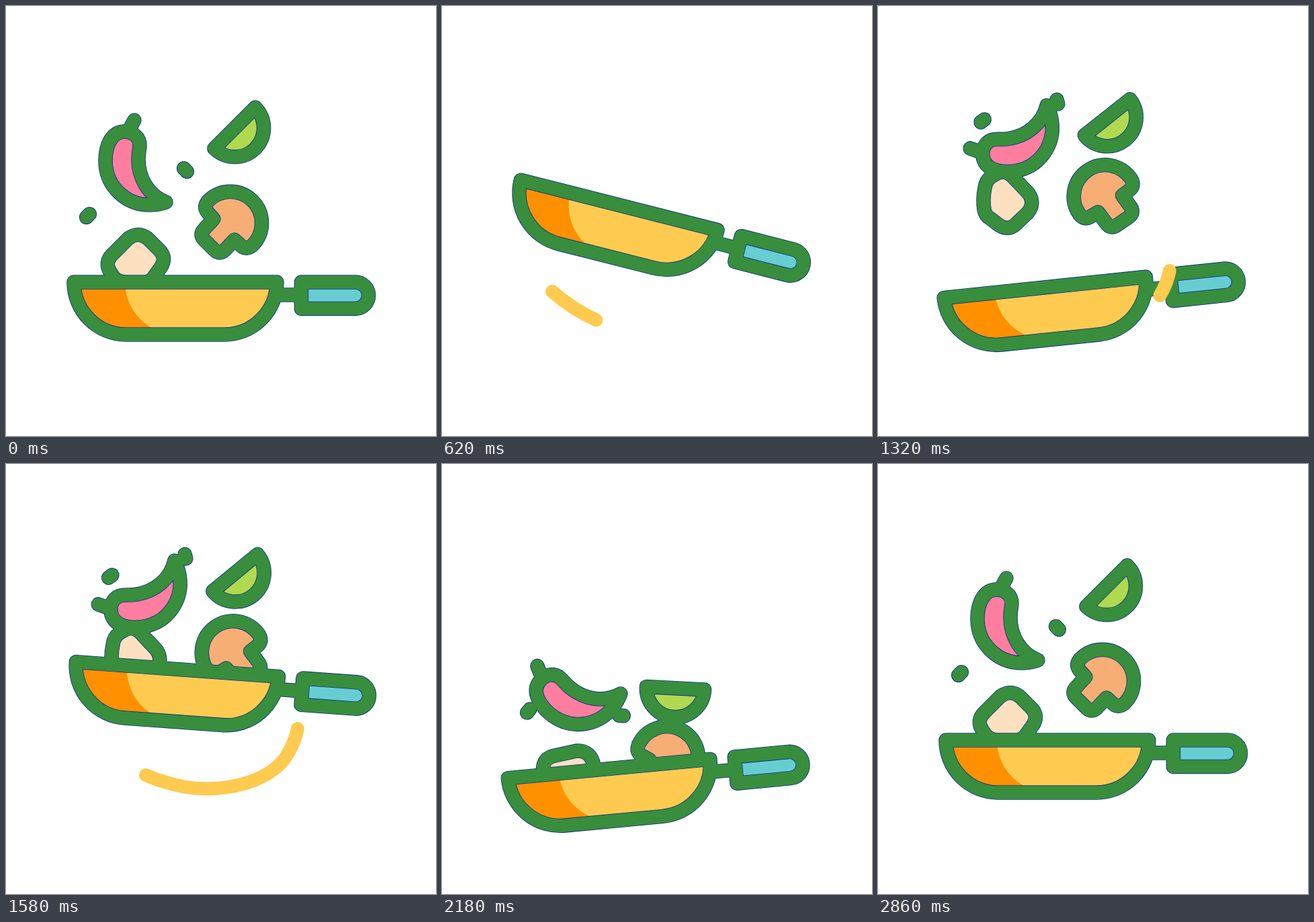
An HTML page with a canvas that plays this animation: 640x640 px, repeating every 3040 ms.

```html
<!DOCTYPE html>
<html lang="en">
<head>
<meta charset="utf-8">
<title>Tossing pan</title>
<style>
html, body { margin: 0; width: 100%; height: 100%; overflow: hidden; background: #fff; }
canvas { display: block; width: 100vmin; height: 100vmin; }
</style>
</head>
<body>
<canvas id="stage" width="640" height="640"></canvas>
<script>
const ctx = document.getElementById('stage').getContext('2d');
const LOOP = 3040, GREEN = '#388e3c', NAVY = '#0e318f', YELLOW = '#fecb50';
const LINE = 19.8, EDGE = 21.5;
ctx.lineJoin = 'round';

const shape = d => new Path2D(d);
const clamp = x => Math.max(0, Math.min(1, x));
const progress = (t, from, to) => clamp((t - from) / (to - from));
const smooth = p => p * p * (3 - 2 * p);
const mix = (a, b, p) => a + (b - a) * p;

// Turning points of the pan: time, lift, tilt in degrees
const swings = [
  [200, 0, 0], [720, -109.5, 17.3], [1150, 34, -8], [1740, -130, 8.5], [2260, 47, -7.5], [2700, 0, 0]
];

function swing(t, column) {
  return swings.slice(1).reduce((value, point, i) =>
    mix(value, point[column], smooth(progress(t, swings[i][0], point[0]))), 0);
}

// Food is [y, turn, drift] at the top of the toss (apex), when it leaves
// the pan for it (low), and when it lies in the pan near the rest pose (dip)
const food = [
  { // garlic
    x: 193.5, y: 376, fill: '#fde0c0', dip: [474, 39], apex: [280, 94], low: [410, 55],
    path: shape('M182 346Q197 335 211 346L229 364Q239 375 231 388L221 402Q217 409 209 411Q193 414 176 411Q165 410 159 402L154 394Q147 381 158 370Z')
  },
  { // mushroom
    x: 336.5, y: 321, fill: '#f6ae75', dip: [456, -24], apex: [269, -82], low: [430, -45],
    path: shape('M309 317L300 307Q293 299 301 290A46 46 0 0 1 367 356Q358 364 350 357L340 348L326 363Q318 371 310 363L295 348Q287 340 295 332Z')
  },
  { // chili
    x: 195, y: 229, fill: '#ff7ea0', dip: [355, -60, -6], apex: [185, -100], low: [388, -75],
    path: shape('M176 187C156 187 148 210 148 230C148 268 178 296 214 296Q226 296 238 292C212 282 197 256 197 228C197 218 199 214 199 207C199 196 190 187 176 187Z'),
    stem: shape('M191 170L184 183')
  },
  { // lime
    x: 347, y: 188, fill: '#b0d94f', dip: [372, 57], apex: [157, 2], low: [379, 66],
    path: shape('M371 151A43 43 0 0 1 310 212Z')
  },
  { // crumbs
    x: 267, y: 244, dip: [399, -50], apex: [122, 30], low: [410, 10],
    stem: shape('M264.7 241.7L269.3 246.3')
  },
  {
    x: 122, y: 312, dip: [378, -6, 8], apex: [156, 8, 32], low: [365, 2, 55],
    stem: shape('M119.7 314.3L124.3 309.7')
  }
];

const bowl = shape('M101 411H403A78 78 0 0 1 325 489H179A78 78 0 0 1 101 411Z');
const bowlLight = shape('M177 411H403A78 78 0 0 1 325 489H255A78 78 0 0 1 177 411Z');
const grip = shape('M439.5 411H520A19.7 19.7 0 0 1 520 450.4H439.5Z');
const neck = shape('M402 430H440');

// Each trail grows for a span of time; its tail follows after a delay
const sweep = (d, length, start, delay) => ({ path: shape(d), length, start, span: 282, delay });
const spark = d => ({ path: shape(d), length: 38, start: 840, span: 80, delay: 120 });
const trails = [
  sweep('M164 425Q195 452 231 468C262 482 300 488 333 481Q378 470 404 433', 272, 540, 210),
  sweep('M434 394Q430 414 419 432C395 475 310 497 239 474Q223 470 208 463', 274, 1280, 330),
  ...['M218 237L211 202', 'M268 243L277 206', 'M311 271L328 246'].map(spark)
];

function stroke(path, color, width, cap = 'round') {
  ctx.strokeStyle = color;
  ctx.lineWidth = width;
  ctx.lineCap = cap;
  ctx.stroke(path);
}

function fill(path, color) {
  ctx.fillStyle = color;
  ctx.fill(path);
}

function scoped(draw) {
  ctx.save();
  draw();
  ctx.restore();
}

// Turn about (px, py), then carry that pivot to (x, y)
function place(x, y, degrees, px, py) {
  ctx.translate(x, y);
  ctx.rotate(degrees * Math.PI / 180);
  ctx.translate(-px, -py);
}

// Flights are parabolas, rides in the pan are smooth
function pose({ y, dip, apex, low }, t) {
  const rest = [y, 0];
  const blend = (a, b, p) => [0, 1, 2].map(i => mix(a[i] ?? 0, b[i] ?? 0, p));
  if (t < 620) return blend(rest, dip, progress(t, 200, 620) ** 2);
  if (t < 940) return blend(dip, low, smooth(progress(t, 620, 940)));
  if (t < 1980) return blend(apex, low, ((t - 1460) / 520) ** 2);
  if (t < 2120) return blend(low, dip, smooth(progress(t, 1980, 2120)));
  return blend(rest, dip, (1 - progress(t, 2120, 2860)) ** 2);
}

function drawItem(item, t, color, width) {
  const [y, turn, drift] = pose(item, t);
  scoped(() => {
    place(item.x + drift, y, turn, item.x, item.y);
    if (item.path) {
      if (color === NAVY) fill(item.path, item.fill);
      stroke(item.path, color, width);
    }
    if (item.stem) stroke(item.stem, color, width);
  });
}

function drawPanLines(color, width) {
  stroke(bowl, color, width);
  stroke(grip, color, width);
  stroke(neck, color, width, 'butt');
}

function drawPanFill() {
  fill(bowl, '#ff9100');
  fill(bowlLight, YELLOW);
  fill(grip, '#68cdd3');
  for (const part of [bowl, grip]) scoped(() => {
    ctx.clip(part);
    stroke(part, NAVY, EDGE);
  });
}

function drawTrail({ path, length, start, span, delay }, t) {
  const head = progress(t, start, start + span);
  const tail = progress(t, start + delay, start + delay + span);
  if (head <= tail) return;
  scoped(() => {
    ctx.setLineDash([(head - tail) * length, 9999]);
    ctx.lineDashOffset = -tail * length;
    stroke(path, YELLOW, 20);
  });
}

function draw(t) {
  const lift = swing(t, 1), tilt = swing(t - 40, 2);
  const placePan = () => place(320, 450 + lift, tilt, 320, 450);
  const inPan = paint => scoped(() => {
    placePan();
    paint();
  });
  // Food shows only above the rim
  const foodPass = (color, width) => scoped(() => {
    const base = ctx.getTransform();
    placePan();
    ctx.beginPath();
    ctx.rect(-400, -800, 1400, 1215);
    ctx.clip();
    ctx.setTransform(base);
    food.forEach(item => drawItem(item, t, color, width));
  });

  ctx.fillStyle = '#fff';
  ctx.fillRect(0, 0, 640, 640);
  foodPass(NAVY, EDGE);
  inPan(() => drawPanLines(NAVY, EDGE));
  foodPass(GREEN, LINE);
  inPan(() => {
    drawPanFill();
    drawPanLines(GREEN, LINE);
  });
  trails.forEach(trail => drawTrail(trail, t));
}

const start = performance.now();
function tick() {
  draw((performance.now() - start) % LOOP);
  requestAnimationFrame(tick);
}
tick();
</script>
</body>
</html>
```
